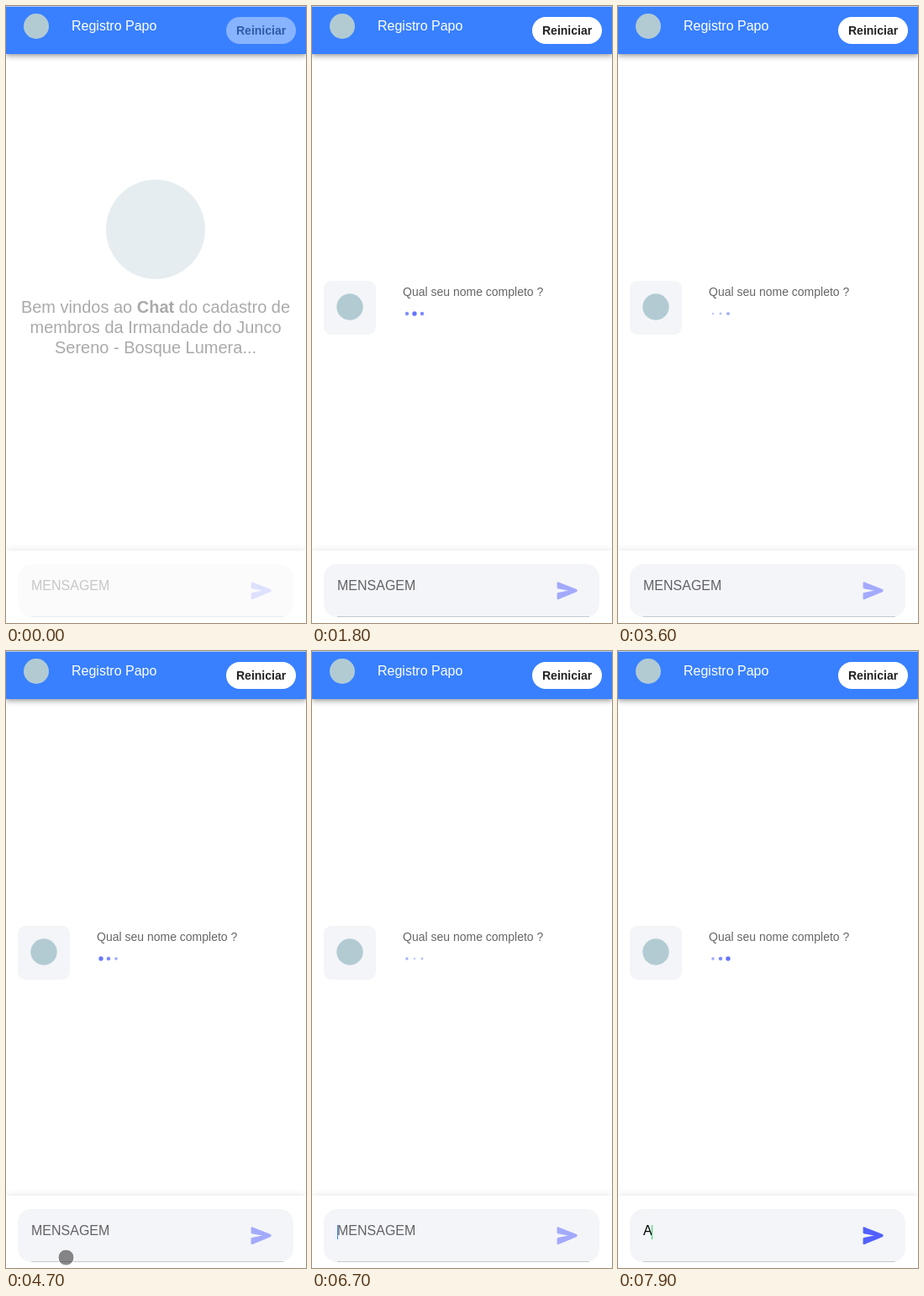
An HTML page that plays this animation: 357x732 px, repeating every 8 s.

```html
<!DOCTYPE html>
<html lang="pt">
<head>
<meta charset="utf-8">
<title>Chat</title>
<style>
  html, body { margin: 0; width: 100%; height: 100%; overflow: hidden; background: #fff; }
  header, footer {
    position: absolute; left: 0; width: 357px;
    box-shadow: 0 2px 4px -1px rgba(0,0,0,.2), 0 4px 5px rgba(0,0,0,.14), 0 1px 10px rgba(0,0,0,.12);
  }
  header { top: 0; height: 57px; background: #3880ff; box-sizing: border-box; border-top: 1px solid #b4cbf3; }
  footer { top: 646px; height: 86px; background: #fff; }
  svg { position: absolute; left: 0; top: 0; display: block; }
  text { font-family: "Liberation Sans", Arial, sans-serif; font-size: 16px; }
  .welcome text { font-size: 20px; fill: #aaa; text-anchor: middle; }
  .bold { font-weight: bold; }
</style>
</head>
<body>
<header></header>
<footer></footer>
<svg width="357" height="732" viewBox="0 0 357 732">
  <circle cx="36" cy="24" r="15" fill="#b2cbd3"/>
  <text x="78" y="29" fill="#fff">Registro Papo</text>
  <g id="restart">
    <rect x="262" y="13" width="83" height="32" rx="16" fill="#fff"/>
    <text x="274" y="34" class="bold" style="font-size:14px" fill="#222">Reiniciar</text>
  </g>

  <g id="welcome" class="welcome">
    <circle cx="178" cy="265" r="59" fill="#e6edf1"/>
    <text x="178" y="364">Bem vindos ao <tspan class="bold">Chat</tspan> do cadastro de</text>
    <text x="178" y="388">membros da Irmandade do Junco</text>
    <text x="178" y="412">Sereno - Bosque Lumera...</text>
  </g>

  <g id="question">
    <rect x="14" y="326" width="62" height="64" rx="9" fill="#f4f5f8"/>
    <circle cx="45" cy="357" r="15.7" fill="#b2cbd3"/>
    <text x="108" y="344" style="font-size:14px" fill="#666">Qual seu nome completo ?</text>
    <g id="dots" fill="#5064ff">
      <circle cx="131" cy="365"/><circle cx="122" cy="365"/><circle cx="113" cy="365"/>
    </g>
  </g>

  <g id="field">
    <rect x="14" y="662" width="328" height="63" rx="16" fill="#f4f5f8"/>
    <path d="M30 724.5H330" stroke="#c8c7cc"/>
    <text id="entry" x="30" y="693"></text>
    <path id="send" fill="#5260ff" d="M291.6 684.5q0-1.7 1.6-1.1L315 692.1q1.6 1.4 0 2.8L293.2 703.9q-1.6.5-1.6-1V697.3q0-1 1-1.2L304.8 693.6 292.6 691.2q-1-.2-1-1.2z"/>
  </g>
  <rect id="caret" y="681" width="1" height="17"/>
  <circle id="pointer" r="9.5" fill="#222" fill-opacity=".53" stroke="#fff"/>
</svg>
<script>
const LOOP = 8000, STEP = 100;
const CHAT_AT = 1200, POINTER_AT = 4700, FOCUS_AT = 6400, TYPED_AT = 7600;
const el = id => document.getElementById(id);
const set = (node, attrs) => { for (const k in attrs) node.setAttribute(k, attrs[k]); };
const show = (node, on) => { node.style.display = on ? '' : 'none'; };
const clamp = v => Math.max(0, Math.min(1, v));
const easeOut = v => 1 - (1 - clamp(v)) ** 3;

function drawDots(t) {
  [...el('dots').children].forEach((dot, i) => {
    const phase = (t + 345 + 110 * i) / 750 % 1;
    const shrink = 2 * Math.min(phase, 1 - phase);
    set(dot, { r: 2.7 * (1 - .6 * shrink), opacity: .9 - .6 * shrink });
  });
}

function drawPointer(t) {
  const enter = easeOut((t - POINTER_AT) / 500);
  const leave = clamp((t - FOCUS_AT) / 100);
  set(el('pointer'), {
    cx: 71.5 + 38 * enter,
    cy: 719.5 - 35 * enter + 28 * leave,
    'stroke-opacity': 1 - enter
  });
  show(el('pointer'), t >= POINTER_AT && t < FOCUS_AT + 200);
}

function drawField(t) {
  const ready = t >= CHAT_AT, typed = t >= TYPED_AT;
  set(el('field'), { opacity: ready ? 1 : .35 });
  el('entry').textContent = typed ? 'A' : 'MENSAGEM';
  set(el('entry'), { fill: typed ? '#000' : '#626266' });
  set(el('send'), { opacity: typed ? 1 : .5 });

  const since = t - (typed ? TYPED_AT : FOCUS_AT);
  set(el('caret'), { x: typed ? 40 : 30, fill: typed ? '#2dd36f' : '#3880ff' });
  show(el('caret'), since >= 0 && since % 1000 < 500);
}

function draw(now) {
  const t = Math.floor(now % LOOP / STEP) * STEP;
  const ready = t >= CHAT_AT;
  show(el('welcome'), !ready);
  show(el('question'), ready);
  set(el('restart'), { opacity: ready ? 1 : .4 });
  drawDots(t);
  drawField(t);
  drawPointer(t);
}

const start = performance.now();
function tick() {
  draw(performance.now() - start);
  requestAnimationFrame(tick);
}
tick();
</script>
</body>
</html>
```
